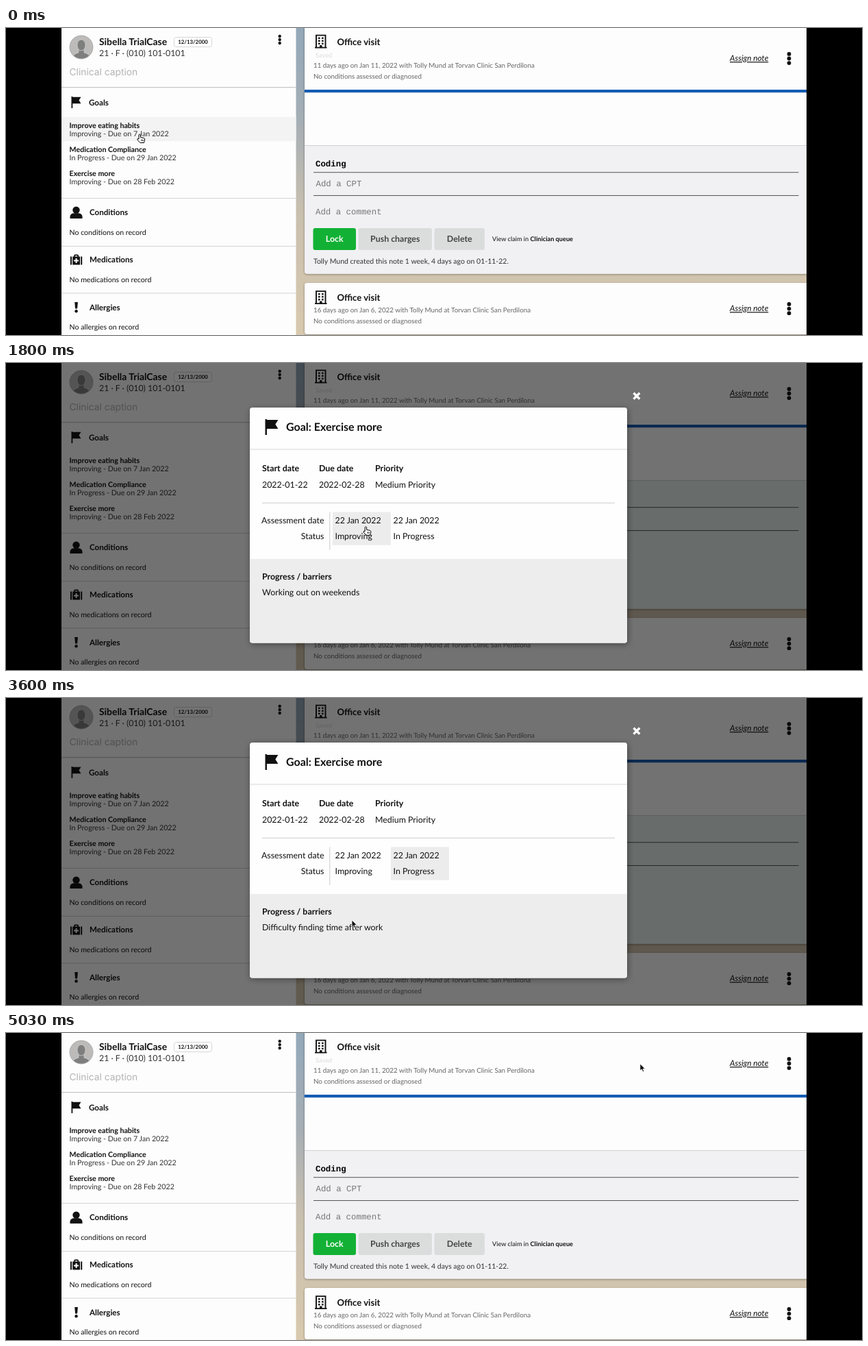
An HTML page for the animation above (5600 ms loop, 1250 px wide and 448 px high).

```html
<!DOCTYPE html>
<html lang="en">
<head>
<meta charset="utf-8">
<title>Goal details</title>
<style>
html, body { margin: 0; width: 100%; height: 100%; overflow: hidden; background: #000; }
svg { display: block; width: 100%; height: 100%; font-family: Lato, sans-serif; }
text { white-space: pre; text-rendering: geometricPrecision; }
.b { font-weight: 700; }
.mono { font-family: "Liberation Mono", monospace; }
.caption { font-family: Inter, sans-serif; }
.link { font-style: italic; text-decoration: underline; }
</style>
</head>
<body>
<svg id="stage" viewBox="0 0 1250 448"></svg>
<script>
const LOOP = 5600;
const OPEN = 760, CLOSE = 4430, SWITCH = 2440;
const INK = '#111', BODY = '#333', MUTED = '#666';
const CLICKS = [[700, 730], [2400, 2440], [4360, 4430]];

// Pointer path: time, x, y of the tip
const PATH = [
  [0, 195, 155], [30, 195, 155], [430, 197, 220], [759, 197, 220],
  [760, 196, 219], [1099, 196, 219], [1100, 526, 237], [1780, 526, 237],
  [2030, 486, 327], [2370, 603, 235], [2899, 603, 236], [2900, 601, 246],
  [3080, 540, 396], [3260, 396, 348], [3460, 417, 322], [3490, 417, 322],
  [3660, 539, 325], [3950, 539, 325], [4345, 926, 45], [LOOP, 926, 45]
];

const text = (x, y, size, string, cls = '', fill = INK, anchor = 'start') =>
  `<text x="${x}" y="${y}" font-size="${size}" class="${cls}" fill="${fill}" text-anchor="${anchor}">${string}</text>`;
const bold = (x, y, size, string, fill) => text(x, y, size, string, 'b', fill);
const rect = (x, y, w, h, fill, extra = '') =>
  `<rect x="${x}" y="${y}" width="${w}" height="${h}" fill="${fill}" ${extra}/>`;
const dots = (x, y, gap, r) =>
  [-1, 0, 1].map(i => `<circle cx="${x}" cy="${y + i * gap}" r="${r}" fill="${INK}"/>`).join('');
const flag = (x, y, scale) =>
  `<path transform="translate(${x} ${y}) scale(${scale})" fill="${INK}"
    d="M0 0H1.8V.8H14L11 5.5L14 10.3H1.8V17H0Z"/>`;

function building(x, y) {
  let windows = '';
  for (let row = 0; row < 3; row++)
    for (const col of [5, 10]) windows += rect(x + col, y + 4 + row * 4, 2.6, 2.4, INK);
  return `<path d="M${x + 2} ${y + 19}V${y + 1}H${x + 15.5}V${y + 19}M${x} ${y + 19}H${x + 17.5}"
    fill="none" stroke="${INK}" stroke-width="1.9"/>` + windows + rect(x + 7, y + 15.5, 3.6, 4, INK);
}

// The title sits at y; the details and the link have their own baselines
function noteHeader(y, detailsY, linkY, when) {
  return building(451, y - 15) + bold(483.5, y, 13.1, 'Office visit') +
    text(449, detailsY, 9.8, `${when} with Tolly Mund at Torvan Clinic San Perdilona`, '', MUTED) +
    text(449, detailsY + 15.3, 9.8, 'No conditions assessed or diagnosed', '', MUTED) +
    text(1057, linkY, 11.8, 'Assign note', 'link') +
    dots(1143.5, linkY - 3.7, 6.6, 2.9);
}

function button(x, w, label, fill, ink) {
  return rect(x, 292, w, 32, fill, 'rx="3"') + text(x + w / 2, 312.4, 12.4, label, 'b', ink, 'middle');
}

function sidebar() {
  const goals = [
    ['Improve eating habits', 'Improving - Due on 7 Jan 2022'],
    ['Medication Compliance', 'In Progress - Due on 29 Jan 2022'],
    ['Exercise more', 'Improving - Due on 28 Feb 2022']
  ].map(([name, state], i) =>
    bold(92.5, 145.5 + i * 35.2, 10.7, name) + text(92.5, 157.7 + i * 35.2, 10.7, state, '', BODY)).join('');
  const sections = [['Conditions', 273.3], ['Medications', 342.3], ['Allergies', 411.8]].map(([name, y]) =>
    bold(122, y, 11.6, name) +
    text(92.5, y + 28.3, 10.6, `No ${name.toLowerCase()} on record`)).join('');
  const icons = `
    <circle cx="102.5" cy="265.6" r="5.2"/>
    <path d="M93.5 278V275.5Q93.5 271 99 270.3H106Q111.5 271 111.5 275.5V278Z"/>
    <path d="M94 333.5h2v12h-2zM97.2 333.5h2v-1.5q0-1.6 1.6-1.6h3.6q1.6 0 1.6 1.6v1.5h2v12h-10.8zM109.2 333.5h2v12h-2zM100.8 332.2v1.3h3.6v-1.3z" fill-rule="evenodd"/>
    <path d="M102.6 336v7M99.1 339.5h7" stroke="#fff" stroke-width="2"/>
    <path d="M100.3 400h4.6l-.8 9.5h-3z"/><circle cx="102.6" cy="413.3" r="2.2"/>`;
  return rect(81, 0, 342.5, 448, '#fdfdfd') + rect(81, 130, 342.5, 35.3, '#f3f3f3', 'id="hover"') +
    `<clipPath id="face"><circle cx="110" cy="28" r="16.5"/></clipPath>
    <circle cx="110" cy="28" r="17" fill="#bcbbba" stroke="#a0a0a0" stroke-width=".8"/>
    <g clip-path="url(#face)" fill="#7e7e7e" stroke="#d4d4d4" stroke-width=".7">
      <path d="M96 46Q97 38 106 36V32H114V36Q123 38 124 46Z"/><ellipse cx="110" cy="25" rx="6" ry="8"/></g>` +
    bold(136, 24.5, 13.9, 'Sibella TrialCase') +
    rect(245.5, 13.5, 55, 14, '#fff', 'rx="3" stroke="#ccc" stroke-width=".8"') +
    text(273, 23.4, 7.8, '12/13/2000', 'b', INK, 'middle') +
    text(136, 40.6, 12.3, '21 · F · (010) 101-0101', '', BODY) +
    text(92.5, 69, 13.8, 'Clinical caption', 'caption', '#b4b4b4') +
    dots(399.7, 17, 5, 2.2) + rect(81, 86, 342.5, 1.2, '#c5c5c5') +
    flag(95.5, 100, 1) + bold(121, 112.6, 11.6, 'Goals') + goals + sections +
    [248, 318, 386.5].map(y => rect(81, y, 342.5, 1, '#d4d4d4')).join('') +
    `<g fill="${INK}">${icons}</g>`;
}

function notes() {
  const card = (y, h) => rect(436, y, 745, h, '#fdfdfd', 'rx="4"');
  return `<g filter="url(#soft)">${card(-10, 368.5)}${card(372, 75)}</g>` +
    noteHeader(24.6, 58.3, 48.2, '11 days ago on Jan 11, 2022') +
    text(452, 43, 9.3, 'Saved', '', '#dcdcdc') +
    rect(436, 90, 733, 4.2, '#145cb3') +
    `<path id="coding" d="M436 171.5H1169V358.5H440Q436 358.5 436 354.5Z"/>` +
    rect(436, 171, 733, 1, '#d0d0d2') +
    text(452, 202.2, 12.4, 'Coding', 'mono b', '#000') +
    text(452.5, 230.8, 12.4, 'Add a CPT', 'mono', '#777') +
    text(452, 271.5, 12.4, 'Add a comment', 'mono', '#777') +
    rect(449, 210.2, 708.5, 1, '#555') + rect(449, 244, 708.5, 1, '#555') +
    button(448.5, 62.5, 'Lock', '#12b135', '#fff') +
    button(514.5, 107.5, 'Push charges', '#dbdddd', '#444') +
    button(625.5, 73.5, 'Delete', '#dbdddd', '#444') +
    text(710, 311.2, 9.2, 'View claim in <tspan class="b">Clinician queue</tspan>') +
    text(449, 343.8, 10.5, 'Tolly Mund created this note 1 week, 4 days ago on 01-11-22.', '', BODY) +
    noteHeader(398.1, 415.3, 413.3, '16 days ago on Jan 6, 2022');
}

function modal() {
  const columns = [
    [374, 'Start date', '2022-01-22'], [457, 'Due date', '2022-02-28'], [539, 'Priority', 'Medium Priority']
  ].map(([x, label, value]) => bold(x, 157.6, 12.4, label) + text(x, 181.5, 12.4, value)).join('');
  const assessments = [[480.5, 'Improving'], [565.5, 'In Progress']].map(([x, state]) =>
    text(x, 234.4, 12.4, '22 Jan 2022') + text(x, 257.3, 12.4, state)).join('');
  return rect(81, 0, 1088, 448, '#000', 'opacity=".55"') +
    rect(356, 65, 551, 343.5, '#fefefe', 'rx="4" filter="url(#deep)"') +
    `<path d="M356 286H907V404.5Q907 408.5 903 408.5H360Q356 408.5 356 404.5Z" fill="#ededed"/>` +
    rect(356, 125.5, 551, 1, '#d8d8d8') + rect(374, 203.7, 515, 1, '#ccc') +
    flag(378.5, 82, 1.35) + bold(409, 99, 16, 'Goal: Exercise more') + columns +
    rect(472.3, 217.5, 1, 55.5, '#ccc') + rect(477, 217.5, 85, 48.2, '#ececec', 'id="chosen"') +
    text(464.5, 234.4, 12.4, 'Assessment date', '', INK, 'end') +
    text(464.5, 257.3, 12.4, 'Status', '', INK, 'end') + assessments +
    bold(374, 316, 12.4, 'Progress / barriers') +
    `<text id="barrier" x="374" y="338.6" font-size="12.4" fill="${INK}"></text>
    <path d="M916.5 43.8L925.3 52.6M925.3 43.8L916.5 52.6" stroke="#fff" stroke-width="3.4"/>`;
}

document.getElementById('stage').innerHTML = `
  <defs>
    <linearGradient id="sky" x2="0" y2="1">
      <stop offset="0" stop-color="#93a8b9"/><stop offset=".3" stop-color="#a5aeb5"/>
      <stop offset=".6" stop-color="#c9bfae"/><stop offset="1" stop-color="#d8c9ae"/>
    </linearGradient>
    <filter id="soft"><feDropShadow dx="0" dy="1" stdDeviation="1.5" flood-opacity=".4"/></filter>
    <filter id="deep"><feDropShadow dx="1" dy="2" stdDeviation="5" flood-opacity=".4"/></filter>
    <clipPath id="screen"><rect x="81" width="1088" height="448"/></clipPath>
  </defs>
  <rect width="1250" height="448"/>
  <g clip-path="url(#screen)">${rect(81, 0, 1088, 448, 'url(#sky)')}${notes()}${sidebar()}<g id="modal">${modal()}</g></g>
  <g id="pointer">
    <g id="ring" fill="none"><circle r="23.3" stroke="#111"/><circle r="22.4" stroke="#fff"/></g>
    <path id="hand" d="M-1 7V.8Q.2-1 1.4.8V4.5L6 5.5Q8 6 7.6 8L6.5 12.5H.8L-3 8.2Q-3.6 6.6-2 6.4ZM3 7.5V10M5 7.8V10" fill="#fff" stroke="#000"/>
    <path id="arrow" d="M0 0V9.8L2.3 7.8L4 11.4L5.6 10.7L4 7.2H7Z" stroke="#fff" stroke-width=".7"/>
  </g>`;

const el = id => document.getElementById(id);
const show = (id, visible) => el(id).setAttribute('visibility', visible ? 'inherit' : 'hidden');
const within = (t, from, to) => t >= from && t < to;

function pointerAt(t) {
  const i = PATH.findIndex(key => key[0] > t);
  const [t0, x0, y0] = PATH[i - 1], [t1, x1, y1] = PATH[i];
  const p = (t - t0) / (t1 - t0), e = p * p * (3 - 2 * p);
  return [x0 + (x1 - x0) * e, y0 + (y1 - y0) * e];
}

function isHand(t, x, y) {
  if (t < OPEN) return true;
  if (t < 1300 || t >= 4460) return false;
  const onAssessment = within(x, 477, 647) && within(y, 217, 266);
  return onAssessment || Math.hypot(x - 921, y - 48) < 12;
}

function draw(t) {
  const [x, y] = pointerAt(t);
  const open = within(t, OPEN, CLOSE), second = t >= SWITCH;
  const row = Math.floor((y - 130) / 35.3);
  show('hover', t < 800);
  el('hover').setAttribute('y', 130 + row * 35.3);
  show('modal', open);
  el('coding').setAttribute('fill', open ? '#e8f2ee' : '#f1f1f4');
  el('chosen').setAttribute('x', second ? 562 : 477);
  el('barrier').textContent = second ? 'Difficulty finding time after work' : 'Working out on weekends';
  el('pointer').setAttribute('transform', `translate(${x} ${y})`);
  const hand = isHand(t, x, y);
  show('hand', hand);
  show('arrow', !hand);
  show('ring', CLICKS.some(([from, to]) => within(t, from, to)));
}

const start = performance.now();
function tick() {
  draw((performance.now() - start) % LOOP);
  requestAnimationFrame(tick);
}
tick();
</script>
</body>
</html>
```
